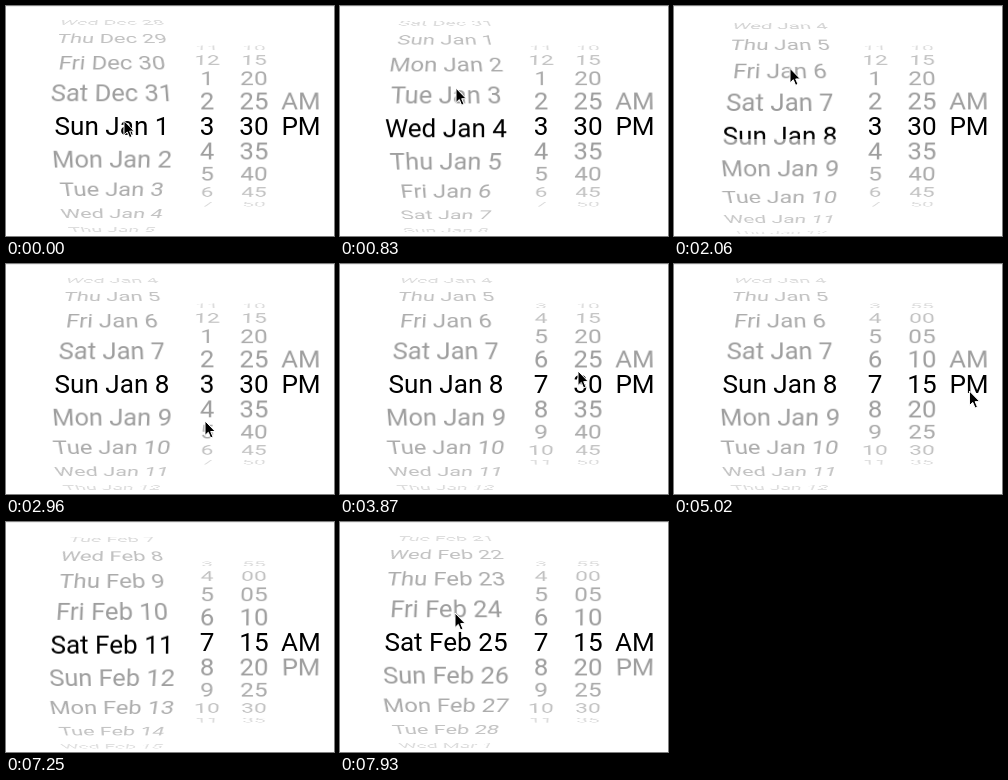
Write an HTML page that moves like this. It is 328x230 px and loops after 7.99 s.

```html
<!DOCTYPE html>
<html lang="en">
<head>
<meta charset="utf-8">
<title>Date and time wheels</title>
<style>
  html, body { margin: 0; width: 100%; height: 100%; overflow: hidden; background: #fff; }
  #stage {
    position: relative; width: 328px; height: 230px; overflow: hidden;
    border-top: 1px solid #ececec; box-sizing: border-box;
    font: 26.1px/30px Roboto, sans-serif; color: #000;
  }
  .wheel { position: absolute; top: 119px; height: 0; }
  .band { position: absolute; left: 0; width: 100%; overflow: hidden; background: #fff; }
  .row {
    position: absolute; left: 0; top: -15px; width: 100%; height: 30px;
    text-align: center; white-space: nowrap;
  }
  .band .row { top: calc(50% - 15px); }
  #cursor { position: absolute; left: -1px; top: -2px; overflow: visible; }
</style>
</head>
<body>
<div id="stage">
  <svg id="cursor" width="13" height="20" viewBox="-1 -1 13 20">
    <path d="M0 0V14.5L3.3 11.4 5.6 17 8 16 5.7 10.6H10.3Z" stroke="#fff"/>
  </svg>
</div>
<script>
const LOOP = 7990, STEP = 17.6, DEPTH = 220, SLOTS = 11;
const LEAD = 200, REACH = 300;   // rest before a flick, travel time to it
const stage = document.getElementById('stage');
const cursor = document.getElementById('cursor');

const mod = (n, m) => ((n % m) + m) % m;
const lerp = (a, b, p) => a + (b - a) * p;
function smooth(p) {
  p = Math.min(Math.max(p, 0), 1);
  return p * p * (3 - 2 * p);
}

function dayLabel(n) {
  const d = new Date(Date.UTC(2017, 0, 1 + n));
  const name = opts => d.toLocaleString('en-US', { timeZone: 'UTC', ...opts });
  return `${name({ weekday: 'short' })} ${name({ month: 'short' })} ${d.getUTCDate()}`;
}

const day = { x: 105.5, width: 156, radius: 110, first: 0, label: dayLabel };
const hour = { x: 200.5, width: 36, radius: 83, first: 3, label: n => String(mod(n - 1, 12) + 1) };
const minute = { x: 248, width: 36, radius: 83, first: 6, label: n => String(mod(n * 5, 60)).padStart(2, '0') };
const period = { x: 295, width: 44, radius: 83, first: 1, label: n => ['AM', 'PM'][n] || '' };
const wheels = [day, hour, minute, period];

// The pointer presses at (x, y) and drags the wheel by a number of rows.
const flicks = [
  { wheel: day, at: 480, time: 385, rows: 3, x: 116, y: 157 },
  { wheel: day, at: 1610, time: 540, rows: 4, x: 116, y: 157 },
  { wheel: hour, at: 2950, time: 540, rows: 4, x: 199, y: 157 },
  { wheel: minute, at: 4040, time: 480, rows: -3, x: 238, y: 107 },
  { wheel: period, at: 5250, time: 600, rows: -1, x: 297, y: 126 },
  { wheel: day, at: 6680, time: 890, rows: 48, x: 117, y: 139 },
  { wheel: day, at: LOOP + 110, time: 1, rows: 0, x: 115, y: 91 }
];

const turned = (f, t) => f.rows * smooth((t - f.at) / f.time);

const position = (w, t) => flicks
  .filter(f => f.wheel === w)
  .reduce((sum, f) => sum + turned(f, t), w.first);

function pointer(t) {
  let x = 118, y = 114;
  for (const f of flicks) {
    const p = smooth((t - f.at + LEAD + REACH) / REACH);
    x = lerp(x, f.x, p);
    y = lerp(y, f.y, p) - turned(f, t) * f.wheel.radius * 0.232;
    y = Math.max(y, -30);
  }
  return [x, y];
}

function add(parent, name) {
  const el = document.createElement('div');
  el.className = name;
  parent.appendChild(el);
  return el;
}

function build(w) {
  const box = add(stage, 'wheel');
  box.style.left = w.x - w.width / 2 + 'px';
  box.style.width = w.width + 'px';
  const makeRows = parent => Array.from({ length: SLOTS }, () => add(parent, 'row'));
  w.rows = makeRows(box);
  const band = add(box, 'band'), half = w.radius / 8.2;
  band.style.top = -half + 'px';
  band.style.height = 2 * half + 'px';
  w.active = makeRows(band);
}

function setRow(el, text, transform, opacity) {
  if (el.textContent !== text) el.textContent = text;
  el.style.transform = transform;
  el.style.opacity = opacity;
}

function drawWheel(w, t) {
  const pos = position(w, t), first = Math.round(pos) - (SLOTS - 1) / 2;
  for (let i = 0; i < SLOTS; i++) {
    const n = first + i, deg = (n - pos) * STEP, rad = deg * Math.PI / 180;
    const cos = Math.cos(rad), y = w.radius * Math.sin(rad), z = w.radius * (1 - cos);
    const transform = `translateY(${y.toFixed(3)}px) perspective(${DEPTH}px) ` +
      `translateZ(${(-z).toFixed(3)}px) rotateX(${(-deg).toFixed(3)}deg)`;
    const text = w.label(n);
    setRow(w.rows[i], text, transform, Math.abs(deg) < 80 ? 0.4 * cos : 0);
    setRow(w.active[i], text, transform, Math.abs(deg) < 30 ? 1 : 0);
  }
}

const start = performance.now();
function draw() {
  const t = (performance.now() - start) % LOOP;
  wheels.forEach(w => drawWheel(w, t));
  const [x, y] = pointer(t);
  cursor.style.transform = `translate(${x}px, ${y}px)`;
  requestAnimationFrame(draw);
}

wheels.forEach(build);
stage.appendChild(cursor);
draw();
</script>
</body>
</html>
```
